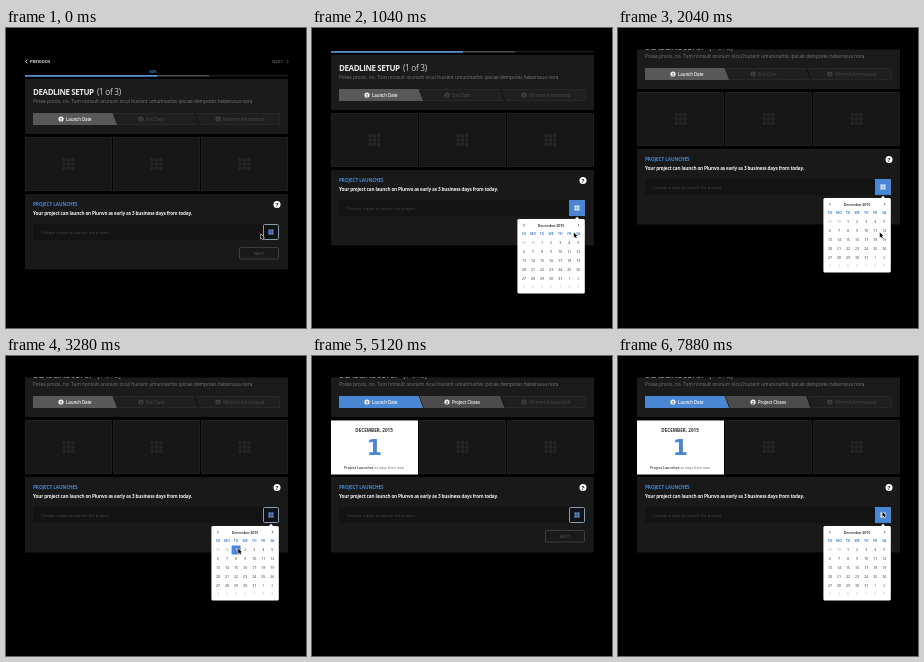
Recreate the animation shown at these times as an HTML page with a canvas. Size 300 by 300 pixels, loop 8000 ms.

```html
<!DOCTYPE html>
<html lang="en">
<head>
<meta charset="utf-8">
<title>Deadline setup</title>
<style>
html, body { margin: 0; width: 100%; height: 100%; overflow: hidden; background: #000; }
canvas { display: block; width: 300px; height: 300px; }
</style>
</head>
<body>
<canvas id="stage"></canvas>
<script>
const LOOP = 8000;
const BLUE = '#4a87d3';
const SANS = '"Open Sans", "Noto Sans", sans-serif';
const canvas = document.getElementById('stage');
const ctx = canvas.getContext('2d');
const dpr = Math.max(1, window.devicePixelRatio || 1);
canvas.width = canvas.height = 300 * dpr;

const clamp = v => Math.min(1, Math.max(0, v));
const mix = (a, b, k) => a + (b - a) * k;
const smooth = v => { v = clamp(v); return v * v * (3 - 2 * v); };
const span = (t, a, b) => smooth((t - a) / (b - a));

// cubic-bezier(.25, .1, .25, 1)
function ease(x) {
  if (x <= 0) return 0;
  if (x >= 1) return 1;
  const curve = (u, a, b) => 3 * (1 - u) * (1 - u) * u * a + 3 * (1 - u) * u * u * b + u * u * u;
  let lo = 0, hi = 1;
  for (let i = 0; i < 24; i++) {
    const mid = (lo + hi) / 2;
    if (curve(mid, .25, .25) < x) lo = mid; else hi = mid;
  }
  return curve(lo, .1, 1);
}

function rect(x, y, w, h, fill) {
  ctx.fillStyle = fill;
  ctx.fillRect(x, y, w, h);
}

function frame(x, y, w, h, color, r = 1) {
  ctx.strokeStyle = color;
  ctx.lineWidth = 1;
  ctx.beginPath();
  ctx.roundRect(x + .5, y + .5, w - 1, h - 1, r);
  ctx.stroke();
}

function text(str, x, y, size, color, weight = 400, align = 'left', gap = 0, family = SANS) {
  ctx.font = `${weight} ${size}px ${family}`;
  ctx.letterSpacing = gap + 'px';
  ctx.textAlign = align;
  ctx.fillStyle = color;
  ctx.fillText(str, x, y);
}

function poly(points, fill) {
  ctx.beginPath();
  points.forEach(([x, y]) => ctx.lineTo(x, y));
  ctx.closePath();
  ctx.fillStyle = fill;
  ctx.fill();
}

function disc(x, y, r, fill) {
  ctx.beginPath();
  ctx.arc(x, y, r, 0, Math.PI * 2);
  ctx.fillStyle = fill;
  ctx.fill();
}

function chevron(x, y, dir, color, s = 1.8) {
  ctx.beginPath();
  ctx.moveTo(x - dir * s / 2, y - s);
  ctx.lineTo(x + dir * s / 2, y);
  ctx.lineTo(x - dir * s / 2, y + s);
  ctx.strokeStyle = color;
  ctx.lineWidth = .9;
  ctx.stroke();
}

function grid(cx, cy, cell, gap, color) {
  const step = cell + gap;
  for (let i = 0; i < 9; i++) {
    rect(cx + (i % 3 - 1) * step - cell / 2, cy + (Math.floor(i / 3) - 1) * step - cell / 2, cell, cell, color);
  }
}

function fade(alpha, draw) {
  if (alpha <= 0) return;
  ctx.save();
  ctx.globalAlpha *= alpha;
  draw();
  ctx.restore();
}

function header() {
  chevron(20.5, 33.5, -1, '#ddd');
  text('PREVIOUS', 24, 35.2, 4.1, '#e4e4e4', 700);
  text('NEXT', 266, 35.2, 4.1, '#555', 700);
  chevron(281.5, 33.5, 1, '#555');
  text('60%', 147, 45.3, 3.5, BLUE, 700, 'center');
  rect(19, 47, 263, 1.5, '#1c1c1c');
  rect(19, 47, 184, 1.5, '#4a4a4a');
  rect(19, 47, 132, 1.7, '#5b8ad4');
}

function stepLabel(n, label, cx, color, hole) {
  disc(cx, 91, 2.6, color);
  text(n, cx, 92.5, 4, hole, 700, 'center');
  text(label, cx + 5, 92.6, 4.4, color, 600, 'left', -.1);
}

function steps(done) {
  rect(27, 85, 247, 12, '#1f1f1f');
  frame(27, 85, 247, 12, '#272727', 0);
  const first = [[27, 85], [106.5, 85], [111, 97], [27, 97]];
  const second = [[107.5, 85], [188, 85], [192.5, 97], [112, 97]];
  ctx.strokeStyle = '#111';
  ctx.lineWidth = 1;
  ctx.beginPath();
  ctx.moveTo(188.5, 85);
  ctx.lineTo(193, 97);
  ctx.stroke();
  poly(first, '#585858');
  fade(done, () => {
    poly(first, BLUE);
    poly(second, '#4c4c4c');
  });
  stepLabel('1', 'Launch Date', 55, '#f2f2f2', '#444');
  fade(1 - done, () => stepLabel('2', 'End Date', 135, '#414141', '#1f1f1f'));
  fade(done, () => stepLabel('2', 'Project Closes', 135, '#eee', '#444'));
  stepLabel('3', 'Winners Announced', 212, '#414141', '#1f1f1f');
}

function intro(done) {
  rect(19, 51, 263, 55, '#1b1b1b');
  text('DEADLINE SETUP', 27, 67.2, 8, '#e6e6e6', 700, 'left', -.43);
  text('(1 of 3)', 91, 67.2, 8.2, '#d2d2d2', 400, 'left', -.3);
  text('Potea procis, no. Tum nonsult orunum nicul hucient umuninarbis ipiciae dempotes haberssua nora',
    27, 74.8, 4.78, '#777');
  steps(done);
}

function cards(done) {
  for (let i = 0; i < 3; i++) {
    const x = 19 + i * 88;
    rect(x, 109, 87, 54, '#171717');
    frame(x, 109, 87, 54, '#1e1e1e', 0);
    grid(x + 43.5, 136, 3.2, 1.1, '#262626');
  }
  fade(done, () => {
    rect(19, 109.5, 87, 54, '#fff');
    text('DECEMBER, 2015', 62, 121.4, 4.6, '#333', 700, 'center');
    text('1', 62.5, 144, 22, BLUE, 700, 'center', 0, '"DejaVu Sans", sans-serif');
    text('Project Launches', 32, 157.6, 3.6, '#333', 600);
    text('as days from now', 92, 157.6, 3.6, '#666', 400, 'right');
  });
}

function dateButton(fill) {
  rect(257, 196, 16, 16, '#0f1318');
  frame(257, 196, 16, 16, '#8b9cb0');
  grid(265, 204, 1.5, .3, '#6a9bdc');
  fade(fill, () => {
    rect(257, 196, 16, 16, BLUE);
    grid(265, 204, 1.5, .3, '#e9f1fb');
  });
}

function form(fill) {
  rect(19, 166, 263, 75.5, '#191919');
  text('PROJECT LAUNCHES', 27, 178.2, 4.7, BLUE, 700, 'left', -.08);
  text('Your project can launch on Plunvo as early as 3 business days from today.',
    27, 186.8, 4.7, '#efefef', 700, 'left', -.17);
  disc(271, 176.5, 3.5, '#fff');
  text('?', 271, 178.7, 6, '#1a1a1a', 700, 'center');
  rect(27, 196, 230, 16, '#131313');
  text('Choose a date to launch the project', 35, 205.7, 4.2, '#4a4a4a', 400, 'left', -.03);
  dateButton(fill);
  frame(233, 219, 40, 12.5, '#3d3d3d');
  text('NEXT', 253, 226.9, 4.2, '#4b4b4b', 600, 'center');
}

function calendar(open, pick) {
  if (open <= 0) return;
  ctx.save();
  ctx.globalAlpha = open;
  ctx.translate(0, (1 - open) * 4);
  poly([[262.5, 215.5], [265, 212.8], [267.5, 215.5]], '#fff');
  ctx.beginPath();
  ctx.roundRect(205.4, 215, 67.4, 74.5, 1.5);
  ctx.fillStyle = '#fff';
  ctx.fill();
  chevron(212, 221.2, -1, '#666', 1.3);
  chevron(266.5, 221.2, 1, '#666', 1.3);
  text('December 2015', 239, 222.5, 3.7, '#444', 700, 'center', -.12);
  const col = i => 212 + i * 9.05;
  ['SU', 'MO', 'TU', 'WE', 'TH', 'FR', 'SA'].forEach((d, i) => text(d, col(i), 231.2, 3.4, BLUE, 700, 'center'));
  for (let i = 0; i < 42; i++) {
    const day = i < 2 ? 29 + i : (i - 2) % 31 + 1;
    const inMonth = i > 1 && i < 33;
    const color = inMonth ? '#666' : i > 34 ? '#d0d0d0' : i < 2 ? '#c4c4c4' : '#888';
    text(day, col(i % 7), 240.2 + Math.floor(i / 7) * 8.85, 3.6, color, 600, 'center');
  }
  fade(pick, () => {
    rect(225.6, 234.5, 9, 9, BLUE);
    text('1', col(2), 240.2, 3.6, '#fff', 600, 'center');
  });
  ctx.restore();
}

function pointer(x, y) {
  ctx.save();
  ctx.translate(x, y);
  ctx.beginPath();
  [[0, 0], [0, 5], [1.2, 4], [2, 5.7], [2.9, 5.3], [2.1, 3.7], [3.6, 3.6]].forEach(([a, b]) => ctx.lineTo(a, b));
  ctx.closePath();
  ctx.lineWidth = 1;
  ctx.lineJoin = 'round';
  ctx.strokeStyle = '#eee';
  ctx.stroke();
  ctx.fillStyle = '#050505';
  ctx.fill();
  ctx.restore();
}

function cursor(t) {
  if (t < 3960) {
    const a = span(t, 40, 400), b = span(t, 2600, 3320);
    const press = span(t, 3440, 3480) - span(t, 3480, 3560);
    const x = mix(mix(254.7, 261.8, a), 232, b);
    const y = mix(mix(206, 204.4, a), 192.5, b) + press * .5;
    fade(1 - span(t, 3680, 3900), () => pointer(x, y));
  } else {
    const k = span(t, 6360, 7080);
    fade(span(t, 6360, 6520), () => pointer(mix(238, 264.5, k), mix(177, 155.8, k)));
  }
}

function draw(t) {
  const scroll = Math.round(45 * ease((t - 768) / 880));
  const done = span(t, 3880, 4440);
  const open = span(t, 440, 800) - span(t, 3680, 3960) + span(t, 7240, 7760);
  const fill = span(t, 280, 480) - span(t, 2640, 2920) + span(t, 6960, 7200);
  const pick = t < 3960 ? span(t, 3080, 3260) : 0;

  ctx.setTransform(dpr, 0, 0, dpr, 0, 0);
  rect(0, 0, 300, 300, '#000');
  ctx.save();
  ctx.beginPath();
  ctx.rect(18, 21.5, 265, 256.5);
  ctx.clip();
  ctx.translate(0, -scroll);
  header();
  intro(done);
  cards(done);
  form(fill);
  calendar(open, pick);
  ctx.restore();
  cursor(t);
}

const start = performance.now();
function tick() {
  draw((performance.now() - start) % LOOP);
  requestAnimationFrame(tick);
}
tick();
</script>
</body>
</html>
```
